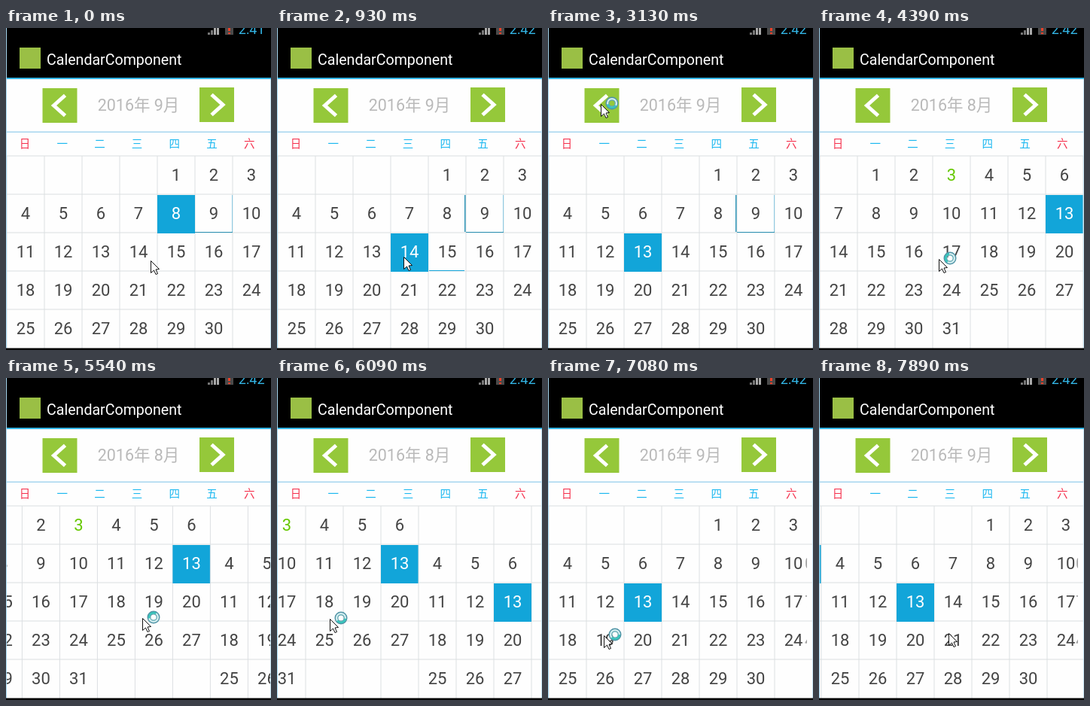
An HTML page with a canvas that plays this animation: 352 px wide and 428 px high, repeating every 8 s.

```html
<!DOCTYPE html>
<html lang="zh">
<meta charset="utf-8">
<style>
html, body { margin: 0; width: 100%; height: 100%; overflow: hidden; background: #fff }
canvas { display: block }
</style>
<canvas id="stage" width="352" height="428"></canvas>
<script>
const ctx = document.getElementById('stage').getContext('2d');
const LOOP = 8000, STEP = 140, PAGE = 350, CELL = 50, ROW = 51, TOP = 170;
const BLUE = '#12a5d9', EDGE = '#2d93b5', PALE = '#a6d6f0', GREEN = '#95c83a', GRID = '#dcdfe2';
const CJK = '"Noto Sans CJK SC", "Noto Sans CJK JP", "Noto Sans CJK", sans-serif';

// Pointer moves: start, end, x, y
const moves = [
  [150, 540, 181, 305],
  [810, 1440, 125, 300],
  [1750, 2320, 60, 300],
  [2440, 2710, 61, 231],
  [2860, 3130, 71, 101],
  [4120, 4390, 160, 307],
  [4520, 5080, 287, 318],
  [5230, 6090, 71, 320],
  [6240, 7080, 75, 342],
  [7470, 7890, 173, 339]
];

// Progress from a to b, advancing once per screen update
function ramp(t, a, b) {
  if (t < a) return 0;
  return Math.min(1, (Math.floor((t - a) / STEP) + 1) * STEP / (b - a));
}

function pointerAt(t) {
  let x = 193, y = 309;
  for (const [a, b, toX, toY] of moves) {
    const p = ramp(t, a, b);
    x += (toX - x) * p;
    y += (toY - y) * p;
  }
  return [Math.round(x), Math.round(y)];
}

function scrollAt(t) {
  if (t < 3840) return -PAGE;
  const drag = 163 * ramp(t, 5230, 6090);
  const settle = 1 - (1 - ramp(t, 6240, 6810)) ** 2;
  return 2 * ramp(t, 7750, 7890) - drag - (PAGE - drag) * settle;
}

function rect(x, y, w, h, color) {
  ctx.fillStyle = color;
  ctx.fillRect(x, y, w, h);
}

function text(s, x, y, size, color, align = 'center', family = 'Roboto, ' + CJK) {
  ctx.font = `${size}px ${family}`;
  ctx.textAlign = align;
  ctx.fillStyle = color;
  ctx.fillText(s, x, y);
}

function month(x, first, days, selected, today) {
  for (let c = 0; c < 7; c++) rect(x + c * CELL + .5, TOP, 1, 256, GRID);
  for (let d = 1; d <= days; d++) {
    const cell = d + first - 1, cx = x + cell % 7 * CELL, y = TOP + Math.floor(cell / 7) * ROW;
    if (d === selected) rect(cx + 1, y + 1, 50, 51, BLUE);
    text(d, cx + 26, y + 33, 22, d === selected ? '#fff' : d === today ? '#66c800' : '#444');
  }
}

function button(x, y, dir) {
  rect(x - 23, y - 23, 46, 46, GREEN);
  ctx.beginPath();
  for (const side of [-1, 0, 1]) ctx.lineTo(x + (side ? -7 : 8) * dir, y + side * 13.5);
  ctx.lineWidth = 5;
  ctx.strokeStyle = '#fff';
  ctx.stroke();
}

function header(t) {
  rect(0, 0, 352, 66, '#000');
  rect(0, 66, 352, 2, '#33b5e5');
  for (let i = 0; i < 4; i++) rect(268 + i * 4, 6 - i * 3, 3, 3 + i * 3, i < 2 ? '#777' : '#aaa');
  rect(291, 0, 11, 9, '#4a4a4a');
  rect(295, 0, 3, 4, '#e8402a');
  rect(295, 6, 3, 2, '#e8402a');
  text(t < 930 ? '2:41' : '2:42', 343.5, 8, 18, '#33b5e5', 'right');
  rect(18, 26, 28, 28, '#9abf45');
  text('CalendarComponent', 54, 49, 19.6, '#fff', 'left');

  button(71.5, 103, -1);
  button(280, 102, 1);
  text(`2016年 ${t >= 3840 && t < 6520 ? 8 : 9}月`, 176, 110, 21.5, '#b9b9b9');
  [...'日一二三四五六'].forEach((s, i) =>
    text(s, 25 + i * 49.7, 158.5, 14.5, i % 6 ? '#1cb8f0' : '#f5334f', 'center', CJK));
  rect(0, 137.5, 352, 1.5, PALE);
}

function arrow(x, y) {
  ctx.save();
  ctx.translate(x - .5, y + .5);
  ctx.beginPath();
  [[0, 0], [0, 16], [4, 12.5], [6.5, 18], [9, 17], [6.5, 11.5], [11, 11]].forEach(p => ctx.lineTo(...p));
  ctx.closePath();
  ctx.fillStyle = '#fff';
  ctx.fill();
  ctx.lineWidth = 1;
  ctx.strokeStyle = '#111';
  ctx.stroke();
  ctx.restore();
}

function busy(x, y, t) {
  const arc = (r, from, to, width, color) => {
    ctx.beginPath();
    ctx.arc(x, y, r, from, to);
    ctx.lineWidth = width;
    ctx.strokeStyle = color;
    ctx.stroke();
  };
  const turn = Math.floor(t / STEP) * STEP / 1000 * Math.PI * 2;
  arc(6, 0, 7, 4, '#d4eef0');
  arc(6, turn, turn + 2.4, 3, '#35c9bd');
  arc(7.8, 0, 7, 1.4, '#4f93a5');
  arc(4.2, 0, 7, 1.2, '#5aa3ae');
}

// Edges left behind by earlier selections
function leftovers(t) {
  rect(251, 271, 50, 1, EDGE);
  rect(300, 222, 1, 49, '#8ccbe4');
  if (t >= 280) rect(249, 222, 1.5, 49, EDGE);
  if (t >= 810 && t < 1880) rect(202, 322, 47, 1, BLUE);
}

// Narrow strip that is not repainted after the swipe
function staleStrip() {
  ctx.save();
  ctx.beginPath();
  ctx.rect(341, 222, 3, 152);
  ctx.clip();
  ctx.globalAlpha = .5;
  month(15, 4, 30, 13);
  ctx.restore();
}

function draw(t) {
  rect(0, 0, 352, 428, '#fefefe');
  for (let r = 0; r < 5; r++) rect(0, TOP + r * ROW - .5, 352, 1, GRID);
  const left = scrollAt(t);
  month(left, 1, 31, 13, 3);
  month(left + PAGE, 4, 30, t < 280 ? 8 : t < 810 ? 15 : t < 1880 ? 14 : 13);
  if (t < 3840) leftovers(t);
  if (t >= 6810) staleStrip();

  header(t);
  rect(0, 0, 1, 426, PALE);
  rect(351, 68, 1, 358, '#c4e2f2');
  rect(0, 425.5, 352, 3, '#000');

  const [x, y] = pointerAt(t);
  if (t >= 1880 && t < 7470) busy(x + 14, y - 1, t);
  arrow(x, y);
}

function frame(now) {
  draw(now % LOOP);
  requestAnimationFrame(frame);
}
requestAnimationFrame(frame);
</script>
</html>
```
